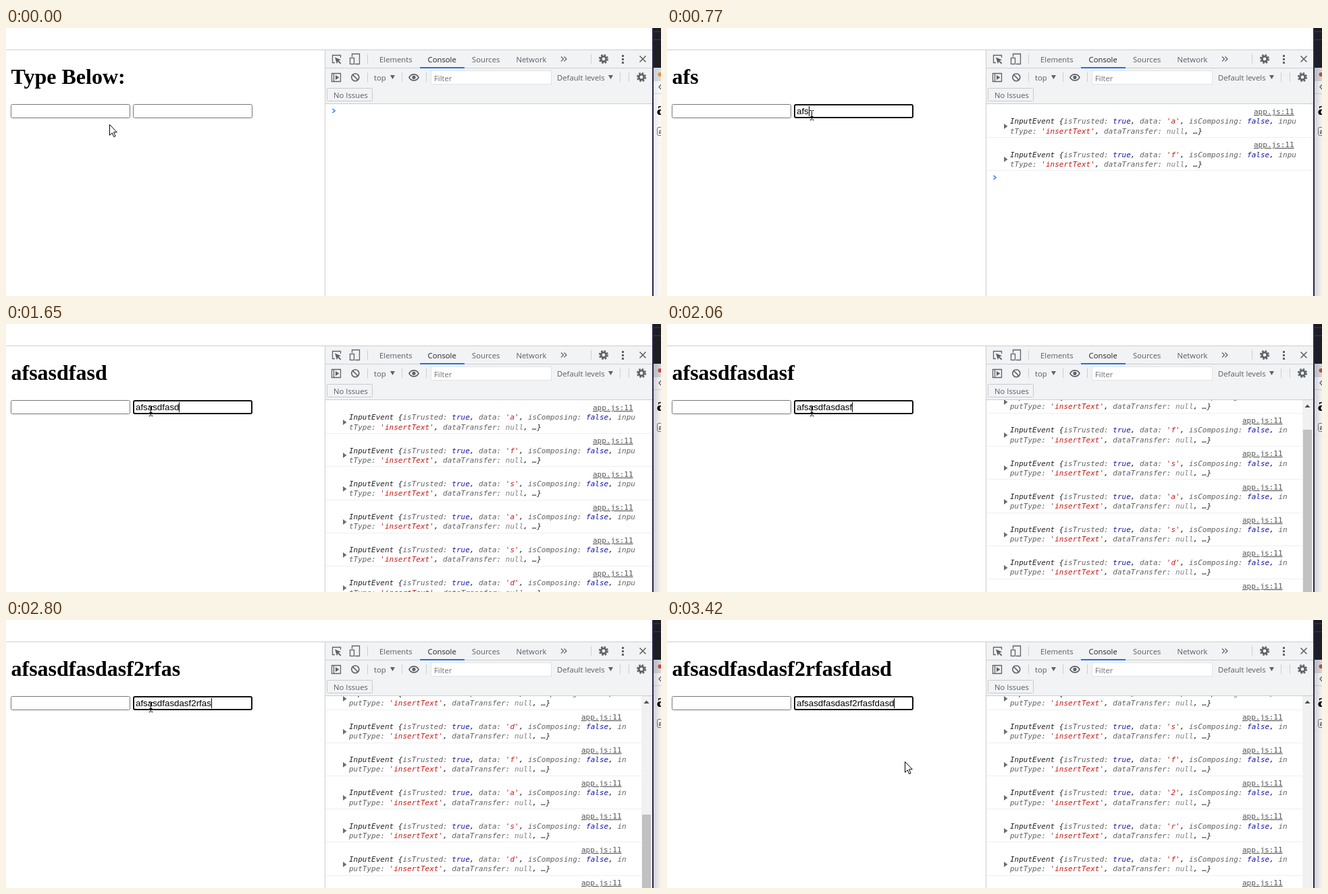
These frames come from a looping animation (970 by 398 pixels, 3490 ms). An HTML page:

```html
<!DOCTYPE html>
<html lang="en">
<head>
<meta charset="utf-8">
<title>Input events</title>
<style>
html, body { margin: 0; width: 100%; height: 100%; overflow: hidden; background: #fff; }
svg { display: block; }
text { white-space: pre; }
.ui { font: 11.3px "Open Sans", "Noto Sans", sans-serif; fill: #5a5e63; }
.mono { font: 11px "DejaVu Sans Mono", monospace; fill: #202124; }
.it { font-style: italic; }
.link { fill: #545454; text-decoration: underline; }
.key { fill: #626262; }
.bool { fill: #1515a8; }
.str { fill: #c41a16; }
.nil { fill: #808080; }
.head { font: bold 32px "Liberation Serif", "Times New Roman", serif; }
.field { font: 13.33px "Liberation Sans", Arial, sans-serif; }
.icon { fill: none; stroke: #5f6368; stroke-width: 1.3; }
.solid { fill: #5f6368; stroke: none; }
</style>
</head>
<body>
<svg width="970" height="398" viewBox="0 0 970 398">
  <defs>
    <clipPath id="pane"><rect x="473" y="113" width="484" height="285"/></clipPath>
    <linearGradient id="shade">
      <stop offset="0" stop-color="#000" stop-opacity=".17"/>
      <stop offset="1" stop-color="#000" stop-opacity=".05"/>
    </linearGradient>
    <g id="gear" class="icon">
      <circle r="3.8" stroke-width="2.8"/>
      <circle r="6" stroke-width="2.2" stroke-dasharray="2.6 2.11"/>
    </g>
  </defs>

  <!-- page -->
  <rect width="970" height="398" fill="#fff"/>
  <rect y="32" width="957" height="1" fill="#cbcdd1"/>
  <text id="head" class="head" x="7.5" y="83"></text>
  <rect x="7.5" y="113.5" width="176" height="20" rx="2" fill="#fff" stroke="#767676"/>
  <rect id="box" fill="#fff"/>
  <text id="typed" class="field" x="192" y="128"></text>
  <rect id="caret" y="116" width="1" height="15"/>

  <!-- console -->
  <g id="logs" clip-path="url(#pane)"></g>
  <g id="bar">
    <rect x="941" y="113" width="16" height="285" fill="#f1f1f1"/>
    <path d="M944.5 124L948.5 119.5L952.5 124Z" fill="#505050"/>
    <rect id="thumb" x="942" width="13" height="360" fill="#c1c1c1"/>
  </g>

  <!-- toolbars -->
  <rect x="472" y="33" width="485" height="80" fill="#f1f3f4"/>
  <path d="M472.5 33V398M473 59.5H957M473 112.5H957" stroke="#cbcdd1"/>
  <rect x="613" y="58" width="66" height="2" fill="#1a73e8"/>
  <path d="M535.5 39V53M866.5 39V53M535.5 66V80M586.5 66V80M622.5 66V80M909.5 66V80M922.5 66V80" stroke="#cbcdd1"/>
  <g id="labels" class="ui"></g>
  <g class="icon">
    <path d="M495.5 44V40.5H483.5V51.5H487"/>
    <path class="solid" d="M487 43.5L496 47.3L492.6 48.6L496.3 52.3L495 53.6L491.4 50L490 53.2Z"/>
    <path d="M512.5 43V38.5H523.5V53.5H517"/>
    <rect x="509.5" y="44.5" width="6" height="9"/>
    <path d="M822 42.5L825.5 46L822 49.5M826.5 42.5L830 46L826.5 49.5"/>
    <path class="solid" d="M912 40h3v3h-3zM912 45h3v3h-3zM912 50h3v3h-3z"/>
    <path d="M938.5 41.5L947.5 50.5M947.5 41.5L938.5 50.5" stroke-width="1.6"/>
    <path d="M482.5 67.5H495.5V79.5H482.5ZM485.5 67.5V79.5"/>
    <path class="solid" d="M488 70L493.5 73.5L488 77Z"/>
    <circle cx="517.3" cy="73.3" r="5.5" stroke-width="1.6"/>
    <path d="M513.4 69.4L521.2 77.2" stroke-width="1.6"/>
    <path class="solid" d="M569 70H576L572.5 76ZM892 70H899L895.5 76Z"/>
    <path d="M597 73.3C600 67.3 608 67.3 611 73.3C608 79.3 600 79.3 597 73.3Z" stroke-width="1.7"/>
    <circle class="solid" cx="604" cy="73.3" r="2.6"/>
  </g>
  <use href="#gear" x="885" y="46"/>
  <use href="#gear" x="941" y="73"/>
  <rect x="629.5" y="63.5" width="178" height="20" fill="#fff" stroke="#e0e2e5"/>
  <text class="ui" x="634" y="79" style="fill:#6b6f74">Filter</text>
  <rect x="475.5" y="89.5" width="67" height="19" rx="1" fill="#f1f3f4" stroke="#c8cbcf"/>
  <text class="ui" x="485" y="104">No Issues</text>

  <!-- window behind -->
  <rect x="957" width="13" height="59" fill="#1d1d24"/>
  <path d="M959 5.5H970M959 17.5H970" stroke="#3a3a44"/>
  <rect x="959" y="59" width="11" height="20" fill="#dee1e6"/>
  <circle id="dot" cx="968.5" cy="69" r="3"/>
  <path d="M970 84L967 87.5L970 91" class="icon"/>
  <path d="M959 97.5H970" stroke="#dcdcdc"/>
  <text class="head" x="963.5" y="129" style="font-size:28px">a</text>
  <rect x="964.5" y="147.5" width="20" height="12" rx="2" fill="#fff" stroke="#767676"/>
  <text class="field" x="966.5" y="157" style="font-size:9px">a</text>
  <rect id="shadow" x="959" y="59" width="11" height="339" fill="url(#shade)"/>
  <rect x="957" width="2" height="398" fill="#2a2350"/>

  <path id="beam" d="M-3 -6.5H-1L0 -5.5L1 -6.5H3M0 -5.5V6.5M-3 7.5H-1L0 6.5L1 7.5H3M-2 2.5H2" fill="none" stroke="#000"/>
  <path id="arrow" d="M.5 .5V16.3L4.2 12.8L6.7 18.6L9 17.6L6.5 11.8H11.3Z" fill="#fff" stroke="#000"/>
</svg>
<script>
const LOOP = 3490, ROW = 49.2, KEYS = "afsasdfasdasf2rfasfdasd";
const FOCUS = 430, VIEW = 661, TRACK = 622;

// time, letters typed, rows logged, pointer x, y (kept when left out)
const STEPS = [
  [0, 0, 0, 153, 143], [80, 0, 0, 160, 146], [150, 0, 0, 174, 145], [220, 0, 0, 190, 141],
  [290, 0, 0, 205, 133], [360, 0, 0, 213, 130], [430, 0, 0, 214, 129], [500, 0, 0],
  [630, 1, 0], [700, 2, 1], [770, 3, 2], [840, 3, 3], [910, 4, 3], [980, 5, 4], [1050, 5, 5], [1120, 6, 6],
  [1380, 7, 7], [1450, 8, 8], [1520, 9, 9], [1650, 10, 10],
  [1860, 11, 11], [1930, 12, 12], [2060, 13, 13], [2260, 14, 14],
  [2460, 15, 14], [2530, 15, 15], [2610, 16, 16], [2730, 17, 16], [2800, 18, 17], [2870, 19, 18], [2940, 20, 19],
  [3010, 21, 20], [3080, 22, 21], [3150, 22, 22], [3220, 23, 22], [3350, 23, 23, 305, 184], [3420, 23, 23, 352, 210]
];

const $ = id => document.getElementById(id);
const set = (id, attrs) => { for (const k in attrs) $(id).setAttribute(k, attrs[k]); };
const show = (id, on) => { $(id).style.display = on ? "" : "none"; };
const span = (cls, s) => `<tspan class="${cls}">${s}</tspan>`;
const pair = (key, cls, val) => span("key", key + ": ") + span(cls, val) + ", ";
const line = (x, y, s, cls = "it") => `<text class="mono ${cls}" x="${x}" y="${y}">${s}</text>`;

$("labels").innerHTML = [
  ["Elements", 553, 51], ["Console", 624.5, 51, "#202124"], ["Sources", 690, 51], ["Network", 755.5, 51],
  ["top", 545, 78], ["Default levels", 816, 78]
].map(([s, x, y, c = "#5a5e63"]) => `<text x="${x}" y="${y}" style="fill:${c}">${s}</text>`).join("");

function logRow(i, top, bar) {
  const y = d => Math.round(top + d);
  const cut = bar ? 2 : 4, word = "inputType";
  const first = "InputEvent {" + pair("isTrusted", "bool", "true") + pair("data", "str", `'${KEYS[i]}'`) +
    pair("isComposing", "bool", "false") + span("key", word.slice(0, cut));
  const second = pair(word.slice(cut), "str", "'insertText'") + pair("dataTransfer", "nil", "null") + "…}";
  return line(bar ? 852 : 869, y(0) + 4, "app.js:11", "link") +
    line(508, y(14.3) + 4, first) + line(508, y(28.5) + 4, second) +
    `<path d="M499 ${y(22) - 4}L504.5 ${y(22)}L499 ${y(22) + 4}Z" fill="#6e6e6e"/>` +
    `<rect x="473" y="${y(38)}" width="${bar ? 468 : 484}" height="1" fill="#efefef"/>`;
}

function drawLogs(m) {
  const bar = m > 12;
  // the row after the cut one rests near y 143 once the pane scrolls
  const base = bar ? 143.15 + (m % 6 > 2 ? 0.55 : 0) - ROW * (m - 12) : 124.1;
  let out = "";
  for (let i = 0; i < m; i++) {
    const top = base + ROW * i;
    if (top > 60 && top < 410) out += logRow(i, top, bar);
  }
  const p = Math.round(base - 1 + ROW * m);
  out += `<path d="M483.5 ${p - 3}L487 ${p}L483.5 ${p + 3}" fill="none" stroke="#367cf1" stroke-width="1.6"/>`;
  $("logs").innerHTML = out;
  show("bar", bar);
  if (bar) {
    const scroll = 30 + ROW * (m - 13);
    set("thumb", { y: Math.round(130 + TRACK * scroll / (VIEW + scroll)) });
  }
}

function draw(k) {
  const [t, n, m] = STEPS[k];
  const [, , , x, y] = STEPS.slice(0, k + 1).reverse().find(s => s.length > 3);
  const focus = t >= FOCUS, text = KEYS.slice(0, n);
  $("head").textContent = text || "Type Below:";
  $("typed").textContent = text;
  set("box", focus
    ? { x: 189, y: 114, width: 175, height: 19, rx: 2, stroke: "#101010", "stroke-width": 2 }
    : { x: 188.5, y: 113.5, width: 176, height: 20, rx: 2, stroke: "#767676", "stroke-width": 1 });
  show("caret", focus);
  set("caret", { x: Math.round(192 + (n ? $("typed").getComputedTextLength() : 0)) });
  set("dot", { fill: focus ? "#e0443e" : "#f0962e" });
  set("shadow", { opacity: focus ? 1 : 0.45 });
  const inField = y > 112 && y < 135;
  show("beam", inField);
  show("arrow", !inField);
  set(inField ? "beam" : "arrow", { transform: `translate(${inField ? x + 0.5 : x} ${y})` });
  drawLogs(m);
}

const start = performance.now();
let last = -1;
function tick() {
  const t = (performance.now() - start) % LOOP;
  const k = STEPS.filter(s => s[0] <= t).length - 1;
  if (k !== last) draw(last = k);
  requestAnimationFrame(tick);
}
tick();
</script>
</body>
</html>
```
